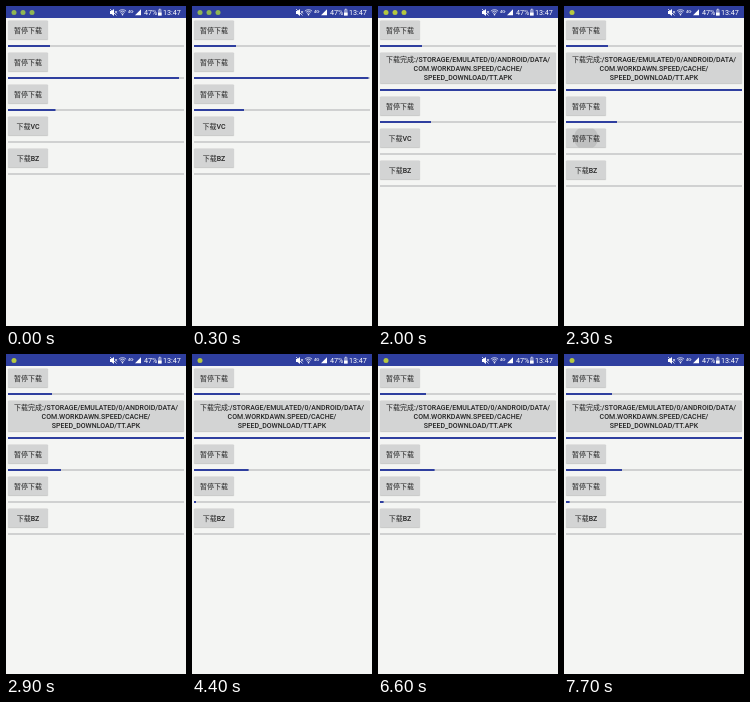
An HTML page with a canvas for the animation above (8000 ms loop, 180x320 px).

```html
<!DOCTYPE html>
<html lang="zh">
<head>
<meta charset="utf-8">
<style>
html, body { margin: 0; width: 100%; height: 100%; overflow: hidden; background: #f4f5f3; }
canvas { display: block; width: 180px; height: 320px; }
</style>
</head>
<body>
<canvas id="stage"></canvas>
<script>
const W = 180, H = 320, LOOP = 8000;
const BLUE = '#2f3f9f', TRACK = '#d0d1d1', BUTTON = '#d3d4d4', INK = '#222';
const FONT = 'Roboto, "Noto Sans CJK SC", "Noto Sans CJK", sans-serif';
const DONE = 2000, CLEARED = 2100, TAP = 2200, STARTED = 2300;
const PAUSE = '暂停下载';
const SAVED = [
  '下载完成:/STORAGE/EMULATED/0/ANDROID/DATA/',
  'COM.WORKDAWN.SPEED/CACHE/',
  'SPEED_DOWNLOAD/TT.APK'
];

// Right end of each bar: [time, x] pairs, held until the next one
const BARS = [
  [[0, 44], [2400, 46], [4000, 48]],
  [[0, 173], [300, 176.5], [DONE, 178]],
  [[0, 49.5], [100, 52], [1800, 53], [2900, 55], [4400, 56.6], [7100, 58]],
  [[0, 2], [4400, 4], [6600, 5.6]],
  [[0, 2]]
];

const canvas = document.getElementById('stage');
const ctx = canvas.getContext('2d');
const dpr = window.devicePixelRatio || 1;
canvas.width = W * dpr;
canvas.height = H * dpr;

function held(keys, t) {
  let value = keys[0][1];
  for (const [time, v] of keys) if (t >= time) value = v;
  return value;
}

function rect(x, y, w, h, color) {
  ctx.fillStyle = color;
  ctx.fillRect(x, y, w, h);
}

function roundRect(x, y, w, h, r) {
  ctx.beginPath();
  ctx.roundRect(x, y, w, h, r);
}

function poly(color, ...points) {
  ctx.fillStyle = color;
  ctx.beginPath();
  points.forEach(([x, y]) => ctx.lineTo(x, y));
  ctx.fill();
}

function circle(x, y, r, color) {
  ctx.fillStyle = color;
  ctx.beginPath();
  ctx.arc(x, y, r, 0, Math.PI * 2);
  ctx.fill();
}

function text(str, x, y, size, color, weight = 400, align = 'left') {
  ctx.font = `${weight} ${size}px ${FONT}`;
  ctx.textAlign = align;
  ctx.fillStyle = color;
  ctx.fillText(str, x, y);
}

function button(y, h, lines, ripple) {
  ctx.save();
  const w = lines.length > 1 ? 176 : 40;
  ctx.fillStyle = BUTTON;
  ctx.shadowColor = 'rgba(0,0,0,.22)';
  ctx.shadowBlur = dpr;
  ctx.shadowOffsetY = 0.4 * dpr;
  roundRect(2, y, w, h, 1);
  ctx.fill();
  ctx.shadowColor = 'transparent';
  if (ripple > 0 && ripple < 1) {
    ctx.clip();
    circle(22, y + h / 2, 6 + 18 * ripple, `rgba(0,0,0,${0.14 * (1 - ripple)})`);
  }
  ctx.restore();
  const first = y + h / 2 + 2.6 - (lines.length - 1) * 4.5;
  lines.forEach((line, i) => text(line, 2 + w / 2, first + i * 9, 7, INK, 500, 'center'));
}

function bar(y, end) {
  rect(2, y, 176, 2, TRACK);
  rect(2, y, end - 2, 2, BLUE);
}

function statusBar(t) {
  rect(0, 0, W, 12, BLUE);
  const count = t < CLEARED ? 3 : 1;
  const tint = t < DONE ? '#8fb653' : '#b5c840';
  for (let i = 0; i < count; i++) circle(8 + i * 9, 6.5, 2.5, tint);

  // Muted speaker
  poly('#fff', [104, 5], [105.5, 5], [108, 3], [108, 10], [105.5, 8], [104, 8]);
  ctx.strokeStyle = '#fff';
  ctx.lineWidth = 0.7;
  ctx.beginPath();
  ctx.moveTo(104, 3);
  ctx.lineTo(110.5, 9.5);
  ctx.moveTo(109, 5);
  ctx.lineTo(111, 7.5);
  ctx.moveTo(111, 5);
  ctx.lineTo(109, 7.5);
  ctx.stroke();

  // Wireless
  for (const r of [2, 3.7, 5.3]) {
    ctx.beginPath();
    ctx.arc(116.5, 9, r, -Math.PI * 0.74, -Math.PI * 0.26);
    ctx.stroke();
  }
  circle(116.5, 8.8, 0.8, '#fff');

  // Mobile data and signal
  text('4G', 122, 6.6, 4, '#fff', 500);
  const active = t < 4400 || (t >= 6000 && t < 6400) || (t >= 6600 && t < 7100) || t >= 7700;
  rect(126, 5, 2, 1, active ? 'rgba(255,255,255,.25)' : 'rgba(255,255,255,.1)');
  poly('#fff', [129, 9.3], [135, 9.3], [135, 3.3]);

  text('47%', 138, 9.2, 7.2, '#fff');
  rect(153, 2.8, 1.6, 0.8, '#fff');
  rect(152, 3.5, 3.6, 6, 'rgba(255,255,255,.45)');
  rect(152, 6.6, 3.6, 2.9, '#fff');
  text('13:47', 157, 9.2, 7.2, '#fff');
}

function draw(t) {
  ctx.setTransform(dpr, 0, 0, dpr, 0, 0);
  rect(0, 0, W, H, '#f4f5f3');
  statusBar(t);

  const done = t >= DONE;
  const labels = [
    [PAUSE],
    done ? SAVED : [PAUSE],
    [PAUSE],
    [t < STARTED ? '下载VC' : PAUSE],
    ['下载BZ']
  ];
  let top = 12;
  labels.forEach((lines, i) => {
    const h = lines.length > 1 ? 36 : 24;
    button(top + 2.5, h - 5, lines, i === 3 ? (t - TAP) / 300 : 0);
    bar(top + h + 3, held(BARS[i], t));
    top += h + 8;
  });
}

function frame() {
  draw(performance.now() % LOOP);
  requestAnimationFrame(frame);
}
frame();
</script>
</body>
</html>
```
